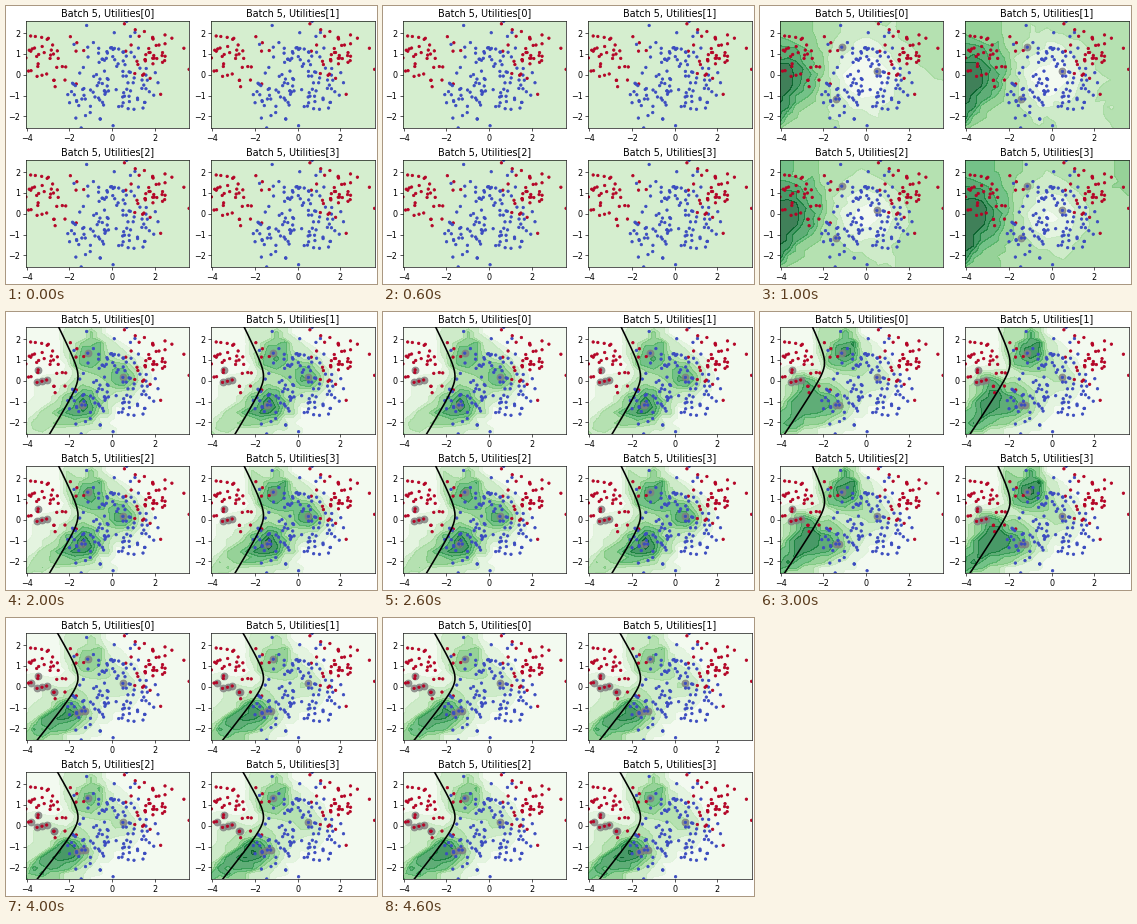
Animation, 371 px wide and 278 px high, one loop 5 s. Source, as a matplotlib script:

```python
import numpy as np
import matplotlib.pyplot as plt
from matplotlib.animation import FuncAnimation

W, H, DPI = 371, 278, 58
CENTERS = [(0, 1), (-3, .5), (-1, -1), (2, 1), (1, -.5)]
LEVELS = np.linspace(0, 1, 10)

plt.rcParams["font.family"] = "DejaVu Sans"


def make_blobs(n=40, std=.7):
    rng = np.random.RandomState(0)
    pts = np.vstack([rng.normal(c, std, (n, 2)) for c in CENTERS])
    labels = np.repeat(np.arange(len(CENTERS)) % 2, n)
    order = np.arange(len(pts))
    rng.shuffle(order)
    return pts[order], labels[order]


X, y = make_blobs()
(x0, y0), (x1, y1) = X.min(axis=0), X.max(axis=0)
GX, GY = np.meshgrid(np.linspace(x0, x1, 21), np.linspace(y0, y1, 21))
MESH = np.column_stack([GX.ravel(), GY.ravel()])
NEAR = np.argsort(np.linalg.norm(MESH[:, None] - X, axis=2), axis=1)[:, :3]

# Utility peaks (x, y, height) once both classes are known.
PEAKS = {
    2: [(-1.1, 1.2, .62), (-1.35, -1.2, .8), (.45, .2, .35), (-3.2, -.8, .25)],
    3: [(-1.05, 1.4, .8), (-3, -.4, .65), (-1.4, -1.1, .35), (-2.3, -1.2, .45)],
    4: [(-1.1, 1.3, .5), (-2.2, -1.3, .8), (-1.3, -1.2, .15), (-3.5, -.2, .2)],
}

# Decision boundary: apex x, apex y, slope above, slope below.
BOUNDS = {
    2: (-1.6, .2, .49, .60),
    3: (-1.95, .85, .46, .655),
    4: (-1.6, .4, .58, .79),
}

# Four queries per cycle; each takes the closest sample.
QUERIES = [
    (-1.17, 1.33), (.47, .12), (-1.36, -1.18), (.55, .05),
    (-3.5, .5), (-3.55, -.07), (-3.13, -.02), (-3.35, -.07),
    (-1.26, -1.28), (-1.5, -1.08), (-1.07, 1.38), (.6, .1),
    (-3.04, -.27), (-3.6, .17), (-2.57, -.27), (-1.73, -1.18),
]
PICKED = [np.argmin(np.linalg.norm(X - q, axis=1)) for q in QUERIES]


def bump(cx, cy, height, width=.6):
    r2 = ((X - (cx, cy)) ** 2).sum(axis=1)
    return height * np.exp(-r2 / (2 * width ** 2))


def utility(k, panel):
    if k == 1:
        u = (.36 + .03 * panel + bump(-3.9, 0, .6, 1.1)
             + bump(0, -.1, -.38, 1.1))
    else:
        u = bump(-.5, .1, .16, 1.2) + bump(.5, .1, .2)
        u = .02 + (1 + .04 * panel) * (u + sum(bump(*p) for p in PEAKS[k]))
    # Nearest samples carry their utility onto the mesh.
    return np.clip(u[NEAR].mean(axis=1), .01, .99).reshape(GX.shape)


def draw_utility(ax, k, panel):
    if k == 0:
        ax.axhspan(y0, y1, color=plt.cm.Greens(.25), alpha=.75, lw=0, zorder=1)
        return
    z = utility(k, panel)
    style = dict(levels=LEVELS, cmap="Greens", vmin=0, vmax=1, zorder=1)
    ax.contourf(GX, GY, z, alpha=.75, **style)
    ax.contour(GX, GY, z, alpha=.6, linewidths=.6, **style)


def draw_boundary(ax, k, bend=.6):
    if k not in BOUNDS:
        return
    ax_x, ax_y, up, down = BOUNDS[k]
    t = np.linspace(y0, y1, 40)
    slope = np.where(t > ax_y, up, down)
    ax.plot(ax_x - slope * (np.hypot(t - ax_y, bend) - bend), t,
            "k", lw=2, zorder=2.1)


fig, grid = plt.subplots(2, 2, figsize=(W / DPI, H / DPI), dpi=DPI,
                         facecolor="white", layout="constrained")


def update(k):
    picked = np.unique(np.array(PICKED[:4 * k], dtype=int))
    for i, ax in enumerate(grid.flat):
        ax.clear()
        draw_utility(ax, k, i)
        ax.scatter(*X[picked].T, c="grey", alpha=.8, marker=".", s=300, zorder=1)
        ax.scatter(*X.T, c=y, cmap="coolwarm", marker=".", zorder=2)
        draw_boundary(ax, k)
        ax.set(xlim=(x0, x1), ylim=(y0, y1),
               xticks=range(-4, 3, 2), yticks=range(-2, 3))
        ax.set_title(f"Batch 5, Utilities[{i}]")


anim = FuncAnimation(fig, update, frames=5, interval=1000, repeat=True,
                     repeat_delay=0)
plt.show()
```
